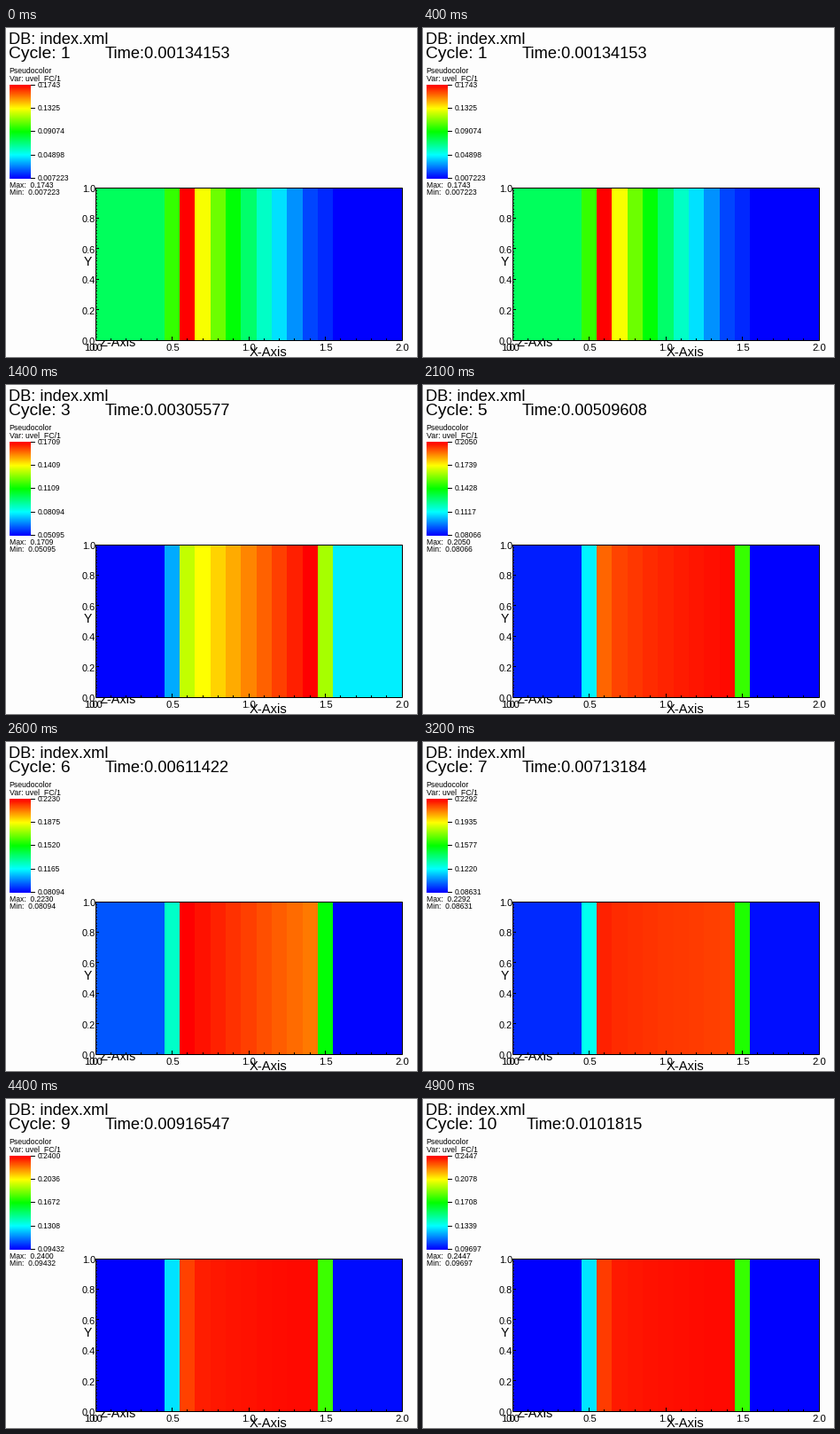
A matplotlib script that plays this animation: 464x371 px, repeating every 5 s.

```python
import numpy as np
import matplotlib.pyplot as plt
from matplotlib.animation import FuncAnimation
from matplotlib.colors import LinearSegmentedColormap

W, H, DPI = 464, 371, 64
PX = 72 / DPI
LEFT, RIGHT, TOP, BOTTOM = 101, 447, 180, 352
HOLD = 5          # animation frames per simulation cycle
CYCLES = 10
CELLS = 21
INLET, OUTLET = 5, 15   # cells where the two outer zones meet the core

HOT = LinearSegmentedColormap.from_list(
    "hot_rainbow", ["#0000ff", "#00ffff", "#00ff00", "#ffff00", "#ff0000"], N=512)

plt.rcParams["font.family"] = "Liberation Sans"

# Key cycles: time, min, max, then levels: left zone, core start, core end,
# core bend, right zone. Cycles in between are interpolated.
KEYS = {
    1: (0.00134153, 0.007223, 0.17426, .41, 1, .07, .62, 0),
    2: (0.00202851, 0.03426, 0.15774, .205, 1, .36, 1.25, .01),
    3: (0.00305577, 0.05095, 0.1709, .005, .69, 1, .8, .235),
    5: (0.00509608, 0.08066, 0.20496, .03, .9, .99, .5, 0),
    6: (0.00611422, 0.08094, 0.2230, .085, 1, .88, .9, .005),
    8: (0.00814945, 0.09168, 0.23536, 0, .93, .99, .25, .025),
    10: (0.0101815, 0.09697, 0.2447, 0, .94, .99, .2, 0),
}


def state_at(cycle):
    return [np.interp(cycle, list(KEYS), column) for column in zip(*KEYS.values())]


def cell_levels(left, start, end, bend, right):
    """Flat outer zones, a bent ramp between them and a mixed cell at each join."""
    levels = np.full(CELLS, left)
    u = np.linspace(0, 1, OUTLET - INLET - 1)
    levels[INLET] = left + .24 * (start - left)
    levels[INLET + 1:OUTLET] = start + (end - start) * u ** bend
    levels[OUTLET] = right + .56 * (end - right)
    levels[OUTLET + 1:] = right
    return levels


fig = plt.figure(figsize=(W / DPI, H / DPI), dpi=DPI, facecolor="#fdfdfd")
ax = fig.add_axes([0, 0, 1, 1])
ax.axis("off")


def label(x, y, text="", size=8.6, ha="left", z=5):
    return ax.text(x, y, text, fontsize=size * PX, ha=ha, va="baseline",
                   color="black", zorder=z)


def line(x, y):
    ax.plot(x, y, color="black", lw=PX, solid_capstyle="butt",
            solid_joinstyle="miter", snap=False, zorder=4)


def image(data, extent):
    return ax.imshow(data, cmap=HOT, vmin=0, vmax=1, extent=extent, aspect="auto",
                     interpolation="nearest", zorder=3)


def to_x(v):
    return LEFT + v * (RIGHT - LEFT) / 2


def to_y(v):
    return BOTTOM - v * (BOTTOM - TOP)


# Header
label(3, 17.7, "DB: index.xml", 18.3)
cycle_text = label(3, 34, size=19.3)
time_text = label(112, 34, size=18.3)

# Legend
label(3.5, 51, "Pseudocolor")
label(3.5, 59, "Var: uvel_FC/1", 8.8)
image(np.linspace(1, 0, 106)[:, None], (4, 28, 170, 64))
tick_texts = []
for y in np.linspace(64, 169, 5).round() + .5:
    line([28, 33], [y, y])
    tick_texts.append(label(35.5, y + 2.3, size=8.5))
max_text = label(3.5, 180, size=8.5)
min_text = label(3.5, 188, size=8.5)

# Field: the cell under each pixel column
columns = np.arange(LEFT, RIGHT) + .5
cell_of_column = np.rint((columns - LEFT) / (RIGHT - LEFT) * (CELLS - 1)).astype(int)
field = image(np.zeros((1, columns.size)), (LEFT, RIGHT, BOTTOM, TOP))
ax.set(xlim=(0, W), ylim=(H, 0))

# Box, ticks and axis labels
line(np.array([LEFT, RIGHT, RIGHT, LEFT, LEFT]) + .5,
     np.array([TOP, TOP, BOTTOM, BOTTOM, TOP]) + .5)
for i in range(1, 20):
    x = np.floor(to_x(i * .1)) + .5
    line([x, x], [BOTTOM, BOTTOM - (4 if i % 5 == 0 else 2)])
for i in range(1, 50):
    y = np.floor(to_y(i * .02)) + .5
    line([LEFT, LEFT + (4 if i % 10 == 0 else 2)], [y, y])
for v in np.arange(5) / 2:
    label(to_x(v) + .5, 363.7, f"{v:.1f}", 11.3, "center")
for v in np.arange(6) / 5:
    label(LEFT, to_y(v) + 5, f"{v:.1f}", 11, "right")
label(88.5, 363.7, "1.0", 11.3)
label(274.5, 369.5, "X-Axis", 14.7)
label(87.5, 268, "Y", 14)
label(105.5, 359, "Z-Axis", 14.5, z=1)


def draw(frame):
    cycle = frame // HOLD + 1
    time, low, high, *shape = state_at(cycle)
    cycle_text.set_text(f"Cycle: {cycle}")
    time_text.set_text(f"Time:{time:.6g}")
    time_text.set_x(112 if cycle < 10 else 117)
    for text, value in zip(tick_texts, np.linspace(high, low, 5)):
        text.set_text(f"{value:#.4g}")
    max_text.set_text(f"Max:  {high:#.4g}")
    min_text.set_text(f"Min:  {low:#.4g}")
    field.set_data(cell_levels(*shape)[cell_of_column][None, :])
    return field, cycle_text, time_text, max_text, min_text, *tick_texts


anim = FuncAnimation(fig, draw, frames=CYCLES * HOLD, interval=100, repeat=True,
                     repeat_delay=0, blit=False)
plt.show()
```
